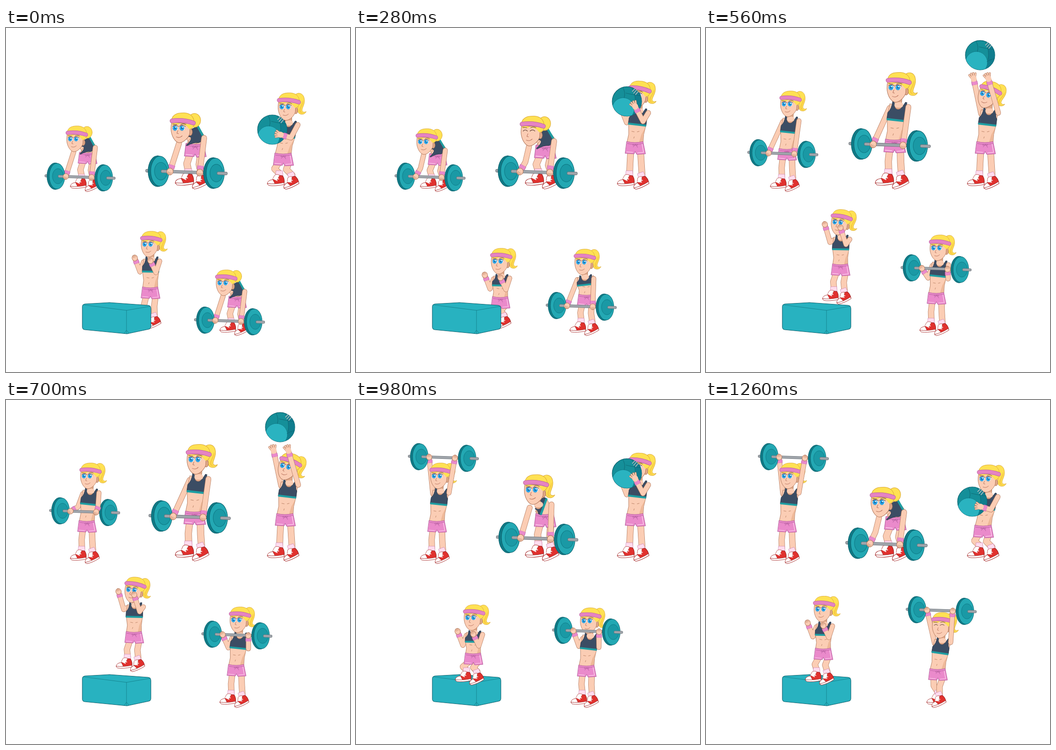
Animation of 748x748 px, one loop 1.33 s. Source, as an HTML page with a canvas:

```html
<!DOCTYPE html>
<html lang="en">
<head>
<meta charset="utf-8">
<title>Workout</title>
<style>
html, body { margin: 0; width: 100%; height: 100%; overflow: hidden; background: #fff; }
canvas { display: block; }
</style>
</head>
<body>
<canvas id="stage" width="748" height="748"></canvas>
<script>
const ctx = document.getElementById('stage').getContext('2d');
const LOOP = 1330, STEP = 70;
const SKIN = '#fbcdb4', SHADE = '#e0a888', EDGE = '#b0765a', HAIR = '#ffe153', HAIR_EDGE = '#dba93a';
const PINK = '#ea8acb', PINK_EDGE = '#b05a9a', NAVY = '#3b4d64', TEAL = '#23a8b3';
const TEAL_DARK = '#0f7a86', TEAL_LIGHT = '#2ab3c0', TEAL_EDGE = '#0d626e', RED = '#e0312e';
ctx.lineCap = ctx.lineJoin = 'round';

// Drawing helpers
function paint(d, fill, edge, width = 0.9) {
  const path = new Path2D(d);
  if (fill) { ctx.fillStyle = fill; ctx.fill(path); }
  if (edge) { ctx.strokeStyle = edge; ctx.lineWidth = width; ctx.stroke(path); }
}
function oval(x, y, rx, ry, fill, edge, width = 0.9) {
  ctx.beginPath();
  ctx.ellipse(x, y, rx, ry, 0, 0, 7);
  if (fill) { ctx.fillStyle = fill; ctx.fill(); }
  if (edge) { ctx.strokeStyle = edge; ctx.lineWidth = width; ctx.stroke(); }
}
function local([x, y], scale, turn, draw) {
  ctx.save();
  ctx.translate(x, y);
  ctx.rotate(turn);
  ctx.scale(scale, scale);
  draw();
  ctx.restore();
}
function tube(points, width, fill, edge) {
  const d = 'M' + points.join(' ');
  paint(d, null, edge, width + 1.5);
  paint(d, null, fill, width);
}

// Motion helpers
const mix = (a, b, k) => a.map((v, i) => v + (b[i] - v) * k);
const add = ([x, y], dx, dy) => [x + dx, y + dy];
const span = (t, from, to) => Math.min(1, Math.max(0, (t - from) / (to - from)));
function ramp(t, from, to) {
  const k = span(t, from, to);
  return k * k * (3 - 2 * k);
}

function shoe(ankle, s, turn) {
  local(ankle, s, turn, () => {
    paint('M-7-9H6L7 3H-8Z', '#ffdcee', '#cf86b4', 0.7);
    paint('M-7 0L6 1Q11 8 9 18H-15Q-17 11-7 0Z', RED, '#8d1b1b');
    paint('M-10 0Q-6-3 0 0L-5 10L-14 8Z', '#fff', '#b55');
    paint('M-14 9Q-25 10-25 18Q-15 21-10 17Z', '#fff', '#a33');
    paint('M-25 17Q-8 19 9 15V19Q-10 23-22 21Z', '#fff', '#a33');
    paint('M-13 7L-5 11M-10 4L-2 8', null, '#fff', 1.6);
  });
}
function leg(top, foot, s) {
  const bend = 0.4 * Math.max(0, 50 * s - Math.hypot(foot[0] - top[0], foot[1] - top[1]));
  tube([top, add(mix(top, foot, 0.5), -bend, 0), add(foot, 0, -3 * s)], 12 * s, SKIN, EDGE);
}

function hand(at, elbow, s, open) {
  const turn = Math.atan2(at[1] - elbow[1], at[0] - elbow[0]);
  local(at, s, turn, () => {
    if (open) for (let a = -0.8; a < 0.7; a += 0.47) {
      tube([[2, a * 5], [3 + 8 * Math.cos(a), 10 * Math.sin(a)]], 2.6, SKIN, EDGE);
    }
    oval(0, 0, 6.5, 6, SKIN, open ? null : EDGE);
    if (!open) paint('M1-3L5-2M1 0H6M1 3L5 2', null, EDGE, 0.7);
  });
}
// Elbows hang below the line from shoulder to hand
function arm(from, to, s) {
  const reach = 27 * s, half = Math.hypot(to[0] - from[0], to[1] - from[1]) / 2;
  const drop = Math.sqrt(Math.max(0, reach * reach - half * half));
  const elbow = add(mix(to, from, 0.6), 0, drop);
  const length = Math.hypot(to[0] - elbow[0], to[1] - elbow[1]) || 1;
  const along = d => mix(to, elbow, d * s / length);
  tube([from, elbow, to], 9.5 * s, SKIN, EDGE);
  ctx.lineCap = 'butt';
  tube([along(6), along(13)], 11 * s, PINK, PINK_EDGE);
  ctx.lineCap = 'round';
  return elbow;
}

function head(at, s, turn, bend, closed) {
  local(at, s, turn, () => {
    if (bend < 0.6) {
      paint('M14-22C20-31 32-28 34-17C37-5 28 3 30 9Q33 13 38 10C35 17 27 16 24 14C16 8 26-2 18-8Z', HAIR, HAIR_EDGE);
      paint('M32-14C34-4 25 3 28 10Q30 13 33 13C24 15 21 9 26 1Z', '#f8cb45');
    } else oval(25, -14, 11.5, 13, HAIR, HAIR_EDGE);
    paint('M-18-14C-16-29 0-28 6-28C20-27 26-18 24-4L18 4L-12-5Z', HAIR, HAIR_EDGE);
    oval(17, 8, 4, 6.5, SHADE, EDGE);
    paint('M-18-10Q-20 3-18 10C-15 22-8 28-3 28C5 28 14 18 16 11L17-8Z', SKIN, EDGE);
    paint('M-18-10L-16-5L-10-8L-7-5L-3-8Q10-6 14 1L17 3L22-6Z', HAIR);
    paint('M-17-13Q4-16 23-9', null, PINK_EDGE, 8.6);
    paint('M-17-13Q4-16 23-9', null, '#e583c3', 7.2);
    if (closed) paint('M-15 0Q-11-4-7 0M-2 0Q3-4 7 0', null, '#57372d', 1);
    else for (const x of [-11, 2]) {
      oval(x, 0.5, 5.8, 5.2, '#fff', '#d3a48c', 0.5);
      oval(x - 0.5, 0.5, 4.2, 4.6, '#2ba6ea', '#1d86c4', 0.5);
      oval(x - 0.5, 0.6, 1.4, 1.7, '#17608f');
      oval(x + 1, -1.3, 1.2, 1.2, '#fff');
      paint(`M${x - 5}-3Q${x}-6.5 ${x + 6}-2.5`, null, '#4a332d', 0.9);
    }
    paint('M-16-7L-8-6M-1-6Q4-9 9-6', null, '#6b4a28', 0.9);
    paint('M-6 5L-8 10L-5 11M-9 17Q-3 20 2 15', null, '#b5705b', 0.9);
  });
}

function torso(chest, hip, s, bend) {
  const k = 20 * bend * bend * s;
  const ribs = add(mix(chest, hip, 0.45), k, -0.86 * k);
  const ux = ribs[0] - chest[0], uy = ribs[1] - chest[1], len = Math.hypot(ux, uy) || 1;
  const w = s * (1 - 0.2 * bend) / len;
  const on = (a, c) => [chest[0] + ux * a + uy * w * c, chest[1] + uy * a - ux * w * c];
  const waist = mix(ribs, hip, 0.55);
  paint('M' + [on(0, -16), on(0.5, -17), on(1, -17.5), add(waist, -15 * s, 0), add(hip, -17 * s, 2),
    add(hip, 16 * s, 2), add(waist, 15.5 * s, 0), on(1, 17.5), on(0.4, 18), on(0, 20)].join(' ') + 'Z', SKIN, EDGE);
  if (bend < 0.3) {
    paint('M' + [on(1.1, 17), add(waist, 14 * s, 0), add(hip, 15 * s, 0), add(hip, 8 * s, 0),
      add(waist, 11 * s, 0)].join(' ') + 'Z', '#eeb897');
    local(mix(ribs, hip, 0.72), s, 0, () => paint('M-3-1L-4 2M-8-12L-3-11M3-11L7-12', null, EDGE, 0.8));
  }
  local(hip, s, 0, () => {
    paint('M-17-1Q0 3 16-1L21 24L3 25L0 19L-2 24L-20 23Z', PINK, PINK_EDGE);
    paint('M-16 3Q0 6 16 3M1 4L-4 10M1 4L5 11M-3 4Q-8 8-1 6Q7 9 4 4', null, PINK_EDGE, 0.8);
    paint('M14 4L17 21L5 22M-17 20L-5 21', null, '#ffd3ee', 1.2);
  });
  paint(`M${on(-0.22, -9)}Q${on(0.75, 0)} ${on(-0.22, 13)}L${on(-0.2, 16)}Q${on(0.35, 13)} ${on(0.5, 18)}` +
    `L${on(1, 18)}L${on(1, -18.5)}L${on(0.55, -18)}Q${on(0.3, -11)} ${on(-0.2, -11)}Z`, NAVY, '#26364a');
  ctx.lineCap = 'butt';
  paint(`M${on(0.98, -18.5)}L${on(0.98, 18)}`, null, '#1f9fa3', 4 * s);
  ctx.lineCap = 'round';
}

function athlete({ s, face, hip, left, right, feet, bend = 0, turn = 0, closed, open, held }) {
  const chest = add(face, (2 + 10 * bend) * s, (33 - 10 * bend) * s);
  const leftElbow = arm(add(chest, -16 * s, 6 * s), left, s);
  if (open) hand(left, leftElbow, s, true);
  feet.forEach((foot, i) => {
    leg(add(hip, (i ? 11 : -9) * s, 18 * s), foot, s);
    shoe(foot, s * (i ? 0.95 : 1), i ? -0.35 : 0);
  });
  torso(chest, hip, s, bend);
  if (bend < 0.5) {
    tube([add(face, 3 * s, 16 * s), add(chest, 0, 2 * s)], 12 * s, SHADE, EDGE);
    tube([add(chest, -2 * s, 0), add(chest, 4 * s, 0)], 9 * s, SKIN, SKIN);
    head(face, s, turn, bend, closed);
  }
  if (held) held();
  hand(right, arm(add(chest, (19 + 12 * bend) * s, (4 - 8 * bend) * s), right, s), s, open);
  if (!open) hand(left, leftElbow, s);
  if (bend >= 0.5) head(face, s, turn, bend, closed);
}

function barbell(at, s) {
  const rod = (a, b) => tube([[a, a * 0.035], [b, b * 0.035]], 4.6, '#a0a5ab', '#6c7278');
  const plate = x => {
    const y = x * 0.035;
    oval(x - 3, y, 18, 29, TEAL_DARK, TEAL_EDGE);
    oval(x + 1, y, 17, 28, TEAL, TEAL_EDGE);
    oval(x + 3, y, 12, 16.5, '#1a99a5', TEAL_DARK);
  };
  local(at, s, 0, () => {
    rod(-74, -62);
    plate(-51);
    rod(-45, 40);
    plate(53);
    rod(60, 74);
  });
}

// Bar stations relative to the feet: floor, hang, shoulders, overhead
const STATIONS = [[-16, -4], [-10, -55], [0, -130], [13, -203]];

// rise: 0 bent over, 1 upright; lift: position along the stations; lunge: feet drawn together
function lifter(x, y, s, t, { rise, lift, lunge = 0, closed }) {
  const from = ([dx, dy]) => [x + dx * s, y + dy * s];
  const i = Math.min(2, Math.floor(lift));
  const bar = from(mix(STATIONS[i], STATIONS[i + 1], lift - i));
  const breath = 6 * (1 - rise) * Math.sin(Math.PI * t / 560);
  const face = mix([-26, -87], [4, -163], rise), hip = mix([0, -57], [-1, -65], rise);
  athlete({
    s, closed, bend: (1 - rise) ** 3,
    face: from(add(face, 5 * lunge, 12 * lunge + breath)),
    hip: from(add(hip, 3 * lunge, 9 * lunge + breath / 2)),
    left: add(bar, -31 * s, -s), right: add(bar, 25 * s, s),
    feet: [from([-12 + 15 * lunge, -1]), from([12 - 6 * lunge, 2])],
    held: () => barbell(bar, s)
  });
}
function press(t) {
  const rise = ramp(t, 350, 540);
  lifter(177, 328, 1, t, { rise, lift: rise + ramp(t, 600, 830) + ramp(t, 840, 980) });
}
function deadlift(t) {
  const rise = ramp(t, 280, 520) - ramp(t, 860, 1030);
  lifter(411, 318, 1.16, t, { rise, lift: rise, closed: t > 210 && t < 490 });
}
function jerk(t) {
  const rise = ramp(t, 140, 380), drive = ramp(t, 900, 1220);
  lifter(502, 641, 1, t, { rise, lift: rise + ramp(t, 330, 640) + 0.73 * drive, lunge: drive, closed: t > 1120 });
}

function ball(at) {
  local(at, 1, 0, () => {
    oval(0, 0, 32, 32, '#158f99', TEAL_EDGE, 1.2);
    ctx.save();
    ctx.clip();
    paint('M12-34Q26 0 8 34H34V-34Z', '#107d8e');
    oval(-8, 16, 24, 24, TEAL_LIGHT, TEAL_DARK);
    paint('M-10-32Q-2-20-6-8M-2-18Q14-14 32-12M15 14Q24 8 33 8M10-32Q22-10 17 10', null, TEAL_EDGE, 0.8);
    ctx.restore();
    paint('M12-22L17-27M15-18L21-25M19-15L24-21', null, '#9db4b9', 2);
  });
}
// The throw runs up to its peak and back down the same way
function thrower(t) {
  const peak = 630, up = peak - Math.abs(peak - t);
  const stand = ramp(up, 60, 280);
  const at = [579 + 17 * ramp(up, 100, 420), 221 - 191 * (up / peak) ** 1.4];
  const handY = Math.max(110, at[1] + 11);
  athlete({
    s: 1.07, turn: 0.26 * ramp(up, 100, 560), open: true,
    face: [612 + stand, 171 - 26 * stand], hip: [603 + 4 * stand, 273 - 25 * stand],
    left: [at[0] - 14, handY], right: [at[0] + 18, handY],
    feet: [[595, 320], [622, 323]], held: () => ball(at)
  });
}

function box() {
  paint('M172 600L225 597L309 603Q315 604 315 610V649Q315 654 310 655L263 665L171 656Q166 655 166 650V606Q166 601 172 600Z', '#28b2c0', TEAL_EDGE, 1.1);
  paint('M168 602L262 614L314 605M262 614V664M257 664L262 657L267 663', null, '#15808c', 0.9);
}
function jumper(t) {
  const flight = span(t, 340, 940), air = Math.sin(Math.PI * flight);
  const crouch = ramp(t, 60, 270) - 0.85 * ramp(t, 320, 580) + 0.85 * ramp(t, 680, 940) - 0.5 * ramp(t, 1020, 1260);
  const foot = [300 - 59 * flight, 625 - 34 * flight - 45 * air];
  const face = add(foot, 13, -155 + 37 * crouch);
  const landed = t >= 560;
  if (landed) box();
  athlete({
    s: 1, face, turn: 0.1 * air, hip: add(foot, 14, -61 + 21 * crouch),
    left: add(face, -33, 30 - 28 * air), right: add(face, 1, 36 - 27 * air),
    feet: [foot, add(foot, 23, 3)]
  });
  if (!landed) box();
}

function frame(now) {
  const t = Math.floor((now % LOOP) / STEP) * STEP;
  ctx.clearRect(0, 0, 748, 748);
  for (const draw of [press, deadlift, thrower, jumper, jerk]) draw(t);
  requestAnimationFrame(frame);
}
frame(0);
</script>
</body>
</html>
```
